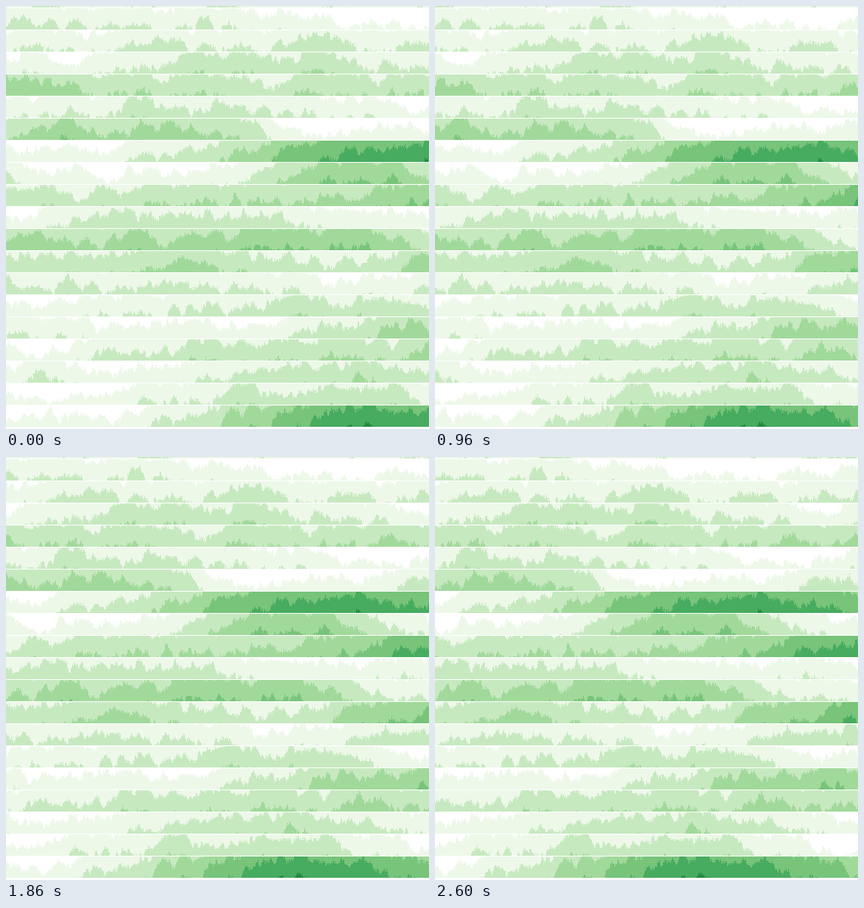
An HTML page with a canvas for the animation above (2620 ms loop, 575x575 px).

```html
<!DOCTYPE html>
<html lang="en">
<head>
<meta charset="utf-8">
<title>Horizon chart</title>
<style>
  html, body { margin: 0; width: 100%; height: 100%; overflow: hidden; background: #fff; }
  body { position: relative; }
  canvas {
    position: absolute; left: 0; top: 0; display: block;
    animation: scroll 2.62s steps(131) infinite;
  }
  @keyframes scroll { to { transform: translateX(-131px); } }
</style>
</head>
<body>
<canvas id="chart" width="705" height="575"></canvas>
<script>
const W = 705, PITCH = 30, BAND = 29;
const COLORS = ['#edf8e9', '#c7e9c0', '#a1d99b', '#77c47a', '#47ab60', '#238b45', '#005a32'];
const ctx = document.getElementById('chart').getContext('2d');

let seed = 20117;
function rand() {
  seed = (seed * 1664525 + 1013904223) % 4294967296;
  return seed / 4294967296;
}

// Catmull-Rom through evenly spaced points, t from 0 to 1
function curve(points, t) {
  const u = t * (points.length - 1), i = Math.floor(u), f = u - i;
  const p = k => points[Math.max(0, Math.min(points.length - 1, k))];
  const a = p(i - 1), b = p(i), c = p(i + 1), d = p(i + 2);
  return b + f * (c - a + f * (2 * a - 5 * b + 4 * c - d + f * (3 * (b - c) + d - a))) / 2;
}

// Random curve with a knot every `step` pixels
function noise(step, amp) {
  const knots = Array.from({ length: Math.ceil(W / step) + 1 }, () => (rand() * 2 - 1) * amp);
  return x => curve(knots, x / W);
}

// One series: a slow trend plus hills, ripples and grain, folded into shades
let base = 2;
function row(...trend) {
  const layers = [noise(45, .35), noise(12, .25), noise(4, .16), noise(1, .1)];
  for (let x = 0; x < W; x++) {
    const v = layers.reduce((sum, layer) => sum + layer(x), Math.max(.3, curve(trend, x / W)));
    COLORS.forEach((color, band) => {
      const h = Math.min(BAND, Math.round((v - band) * BAND));
      if (h <= 0) return;
      ctx.fillStyle = color;
      ctx.fillRect(x, base - h, 1, h);
    });
  }
  base += PITCH;
}

// Trend of each row at the start, one third, two thirds and the end
row(.9, .9);
row(1.4, 1.2, .4, .6);
row(.9, 1.3, 1.2, 1.2);
row(.4, 1.8, 1.6, .8);
row(2.5, 1.8, 1.8, 2.4);
row(.7, 1.7, .7, .6);
row(2.5, 2.5, .2, 1.8);
row(.2, 1.4, 4.7, 3.9);
row(1, .4, 3.1, .8);
row(1.5, 2.3, 2.3, 4.9);
row(.8, 1.8, 1, .7);
row(2.7, 2.6, 3.1, .5);
row(1.5, 2.2, 1.8, 3.9);
row(1.5, 1.4, .9, 1.8);
row(.6, 1.2, 1.8, .7);
row(1.3, .4, 2, 3);
row(.3, 1.8, 2.1, 2.4);
row(1, .8, 2.1, .6);
row(.5, 1.1, 1.9, .1);
row(.1, 1.2, 4.9, 3.4);
</script>
</body>
</html>
```
